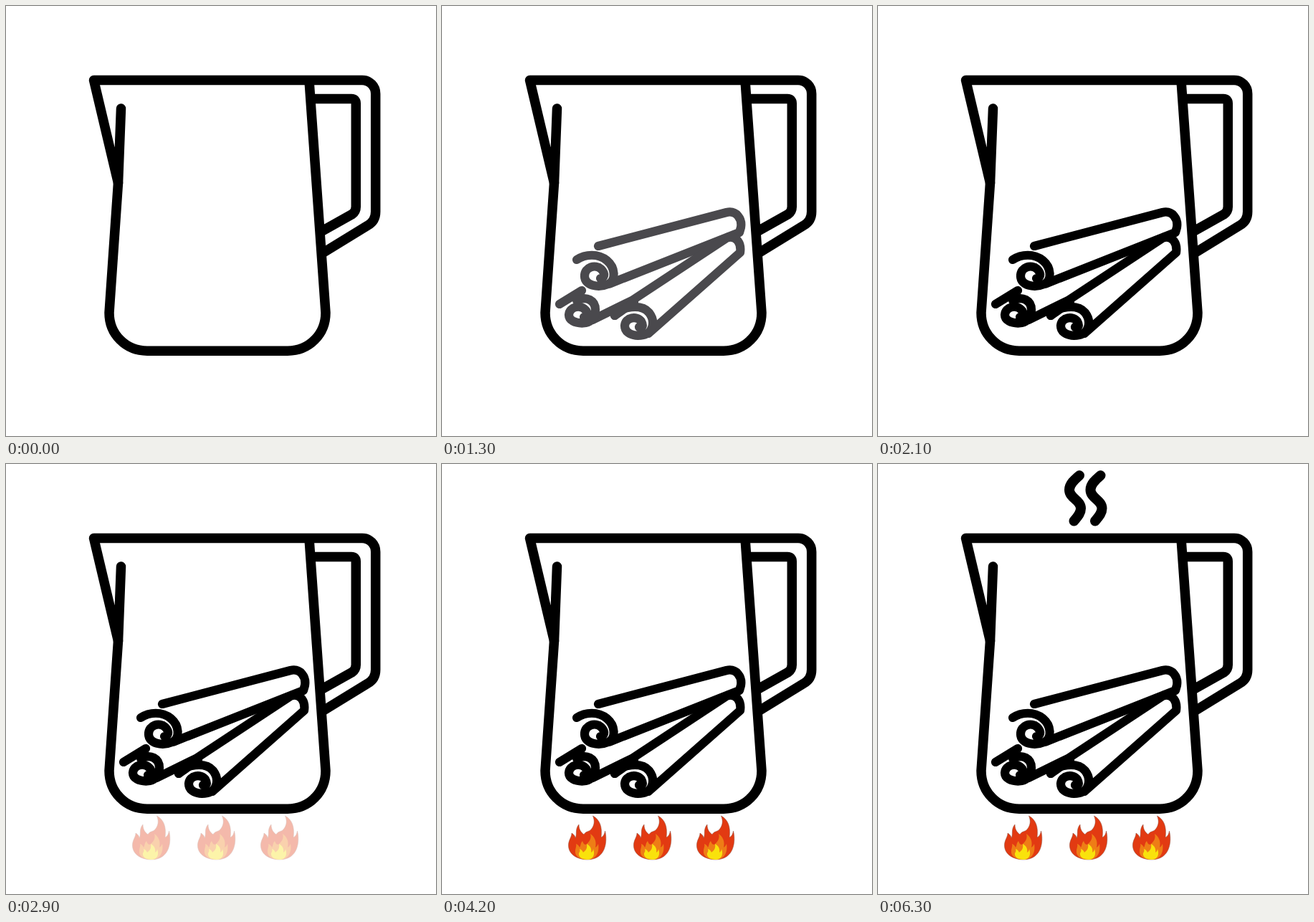
An HTML page without scripts that plays this animation: 600 by 600 pixels, repeating every 8300 ms.

```html
<!DOCTYPE html>
<html lang="en">
<head>
<meta charset="utf-8">
<title>Cinnamon brew</title>
<style>
  html, body { margin: 0; width: 100%; height: 100%; overflow: hidden; background: #fff; }
  svg { display: block; width: 100%; height: 100%; }
  .line { fill: none; stroke: #000; stroke-linecap: round; stroke-linejoin: round; }
  .jug { stroke-width: 13.5; }
  .sticks { stroke-width: 12.2; animation: sticks 8.3s infinite; }
  .fire { animation: fire 8.3s infinite; }
  .steam { stroke-width: 14; animation: steam 8.3s infinite; }

  @keyframes sticks {
    0% { stroke: #fff; animation-timing-function: step-end; }
    1.205% { stroke: #e6e6e7; animation-timing-function: steps(7); }
    9.639% { stroke: #858387; animation-timing-function: step-end; }
    12.048% { stroke: #6d6c70; animation-timing-function: step-end; }
    13.253% { stroke: #626165; animation-timing-function: step-end; }
    15.663% { stroke: #4a494d; animation-timing-function: steps(4); }
    25.301%, 100% { stroke: #000; }
  }
  @keyframes fire {
    0% { opacity: 0; animation-timing-function: step-end; }
    27.711% { opacity: .05; animation-timing-function: steps(19); }
    50.602%, 100% { opacity: 1; }
  }
  @keyframes steam {
    0% { opacity: 0; animation-timing-function: step-end; }
    53.012% { opacity: .1; animation-timing-function: steps(4); }
    62.651% { opacity: .5; animation-timing-function: step-end; }
    63.855% { opacity: .55; animation-timing-function: step-end; }
    66.265% { opacity: .65; animation-timing-function: steps(8); }
    75.904%, 100% { opacity: 1; }
  }
</style>
</head>
<body>
<svg viewBox="0 0 600 600">
  <defs>
    <g id="flame">
      <path fill="#e23a12" stroke="#8a4a3a" stroke-width=".5" d="M203 552C189 552 177 545 176.500 533C176 525 181 521 181 515C184 517 186 519 186 522C189 517 185 510 191 503C191 510 194 514 198 517C200 513 204 513 207 511C212 506 214 499 210.500 491C220 496 224 506 222 521C225 520 227 516 227.500 512C231 526 229 552 203 552Z"/>
      <path fill="#ee7d16" d="M203 552C192 552 185 547 186 540C186 536 188 534 187 530C190 531 191 533 192 535C194 532 193 529 196 526C197 529 198 531 201 531C206 527 209 522 207 516C213 520 216 527 214 535C216 534 217 532 218 530C220 542 215 552 203 552Z"/>
      <path fill="#f9e20c" d="M203 552C195 552 190 548 191 543C192 541 193 540 192 537C195 538 196 540 197 542C201 539 203 536 202 530C207 533 209 537 208 542C210 541 211 539 211 537C214 545 211 552 203 552Z"/>
    </g>
    <path id="wisp" d="M281 16C274 22 267 28 267 36C267 48 283 50 283 62C283 69 278 74 273.500 79.500"/>
  </defs>

  <g class="line sticks">
    <path d="M218 335L397 288C411 285 419 297 417 309L415 316L234 387.500"/>
    <path d="M188 354C200 346 218 345 230 355C242 365 243 383 232 388C218 394 199 390 199 377C199 364 214 360 222 367C229 374 226 380 221 380"/>
    <path d="M164 416L195 397M400 322L265 411L210 438"/>
    <path d="M188 411C202 404 214 411 214 424C214 436 206 442 197 442.500C185 443 177 438 177 431C178 419 194 416 201 425C204 430 202 434 198 434"/>
    <path d="M268 413L241 432M400 323C411 321 418 331 416 344L288 457"/>
    <path d="M241 432C250 419 278 415 289 428C299 441 293 457 281 459C266 462 255 456 255 446C256 434 272 432 278 440C282 447 279 449 275 448"/>
  </g>

  <g class="line jug">
    <path d="M443 344L505 306C512 302 515.700 296 515.700 287V122.500C515.700 112 507.500 103.500 497 103.500H122.500L156.500 247L160.500 143"/>
    <path d="M156.500 247L144 428C144 458 167 481.200 197 481.200H393C423 481.200 446 458 446 428L423 104"/>
    <path d="M430 129.500H482Q488.300 129.500 488.300 136V280Q488.300 287 483 290.500L442 313.500"/>
  </g>

  <g class="fire">
    <use href="#flame"/>
    <use href="#flame" x="91"/>
    <use href="#flame" x="179"/>
  </g>

  <g class="line steam">
    <use href="#wisp"/>
    <use href="#wisp" x="29.500"/>
  </g>
</svg>
</body>
</html>
```
